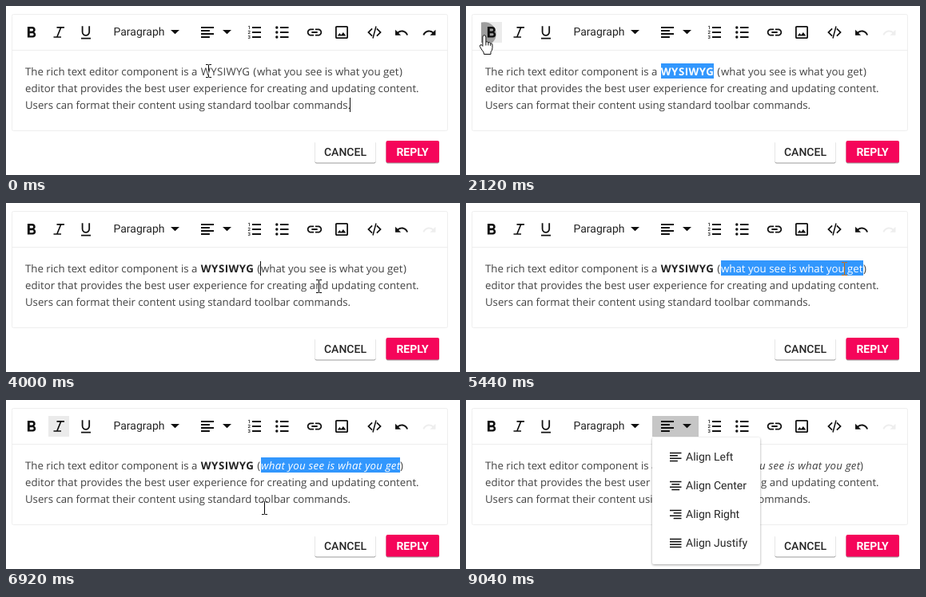
Write an HTML page that moves like this. It is 568x212 px and loops after 9760 ms.

```html
<!DOCTYPE html>
<html lang="en">
<head>
<meta charset="utf-8">
<title>Rich text editor</title>
<style>
  html, body { margin: 0; width: 100%; height: 100%; overflow: hidden; background: #fff; }
  svg { display: block; }
  #stage { width: 568px; height: 212px; }
  text { text-rendering: geometricPrecision; white-space: pre; }
  .copy { font: 13.25px "Open Sans", "Noto Sans", sans-serif; fill: #424242; }
  .wide { letter-spacing: .25px; }
  .bold { font-weight: 700; letter-spacing: .5px; }
  .italic { font-style: italic; letter-spacing: .29px; }
  .ui { font: 14px Roboto, Arial, sans-serif; fill: #262626; }
  .raised { filter: drop-shadow(0 1px .5px rgba(0,0,0,.4)); }
  #panel { filter: drop-shadow(0 1.5px 1.5px rgba(0,0,0,.36)); }
  #beam { mix-blend-mode: difference; }
</style>
</head>
<body>
<svg id="stage" viewBox="0 0 568 212" xmlns="http://www.w3.org/2000/svg">
  <rect width="568" height="212" fill="#fff"/>
  <rect x="7.5" y="10.5" width="545" height="146" rx="2" fill="none" stroke="#eee"/>
  <path d="M8 55.5H552" stroke="#eee"/>

  <g id="backs"></g>
  <g id="icons" fill="#111"></g>
  <text class="ui" x="134.5" y="37">Paragraph</text>

  <rect id="mark" y="72" height="19" fill="#3297fd"/>
  <g class="copy">
    <text x="24" y="87">The rich text editor component is a</text>
    <text id="word" x="243.8" y="87">WYSIWYG</text>
    <text id="open" y="87">(</text>
    <text id="phrase" y="87">what you see is what you get</text>
    <text id="close" y="87">)</text>
    <text x="24" y="108" style="letter-spacing:.012px">editor that provides the best user experience for creating and updating content.</text>
    <text x="24" y="129" style="letter-spacing:-.03px">Users can format their content using standard toolbar commands.</text>
  </g>
  <path id="caret" d="M0 0V18" stroke="#111"/>

  <rect class="raised" x="386.5" y="169" width="76" height="27.5" rx="2" fill="#fff"/>
  <text class="ui" x="424.5" y="188" text-anchor="middle" style="font-weight:500">CANCEL</text>
  <rect class="raised" x="475.5" y="169" width="66.5" height="27.5" rx="2" fill="#f5055a"/>
  <text class="ui" x="508.5" y="188" text-anchor="middle" style="font-weight:700;fill:#fff">REPLY</text>

  <g id="menu">
    <rect id="panel" rx="2" fill="#fff"/>
    <rect id="hover" x="233" width="135" height="36" fill="#eee"/>
    <g id="items"></g>
  </g>

  <path id="beam" fill="none" stroke="#fff"
    d="M-3.5-8H-1Q0-8 0-7Q0-8 1-8H3.5M0-7V7M-3.5 8H-1Q0 8 0 7Q0 8 1 8H3.5"/>
  <path id="hand" fill="#fff" stroke="#111" stroke-linejoin="round"
    d="M-1.6 1.5Q-1.6-.8.4-.8T2.4 1.5V7.6q1.9-1 3 .8 1.9-.8 2.8.9 2.3-.4 2.3 2V15q0 3-2 5.2V23H0q0-2.6-2-4.6-2.4-3.2-3.2-5.4 0-2.2 1.9-1.8 1 .4 1.7 1.7ZM2.4 7.6V12M5.4 8.4V12M8.2 9.3V12.4"/>
</svg>
<script>
const LOOP = 9760, STEP = 40;
const NS = 'http://www.w3.org/2000/svg';
const $ = id => document.getElementById(id);

function set(node, attrs) {
  for (const key in attrs) node.setAttribute(key, attrs[key]);
  return node;
}
function add(parent, tag, attrs) {
  return parent.appendChild(set(document.createElementNS(NS, tag), attrs));
}
const show = (node, on) => { node.style.display = on ? '' : 'none'; };
const within = (t, from, to) => t >= from && t < to;

// Toolbar icons
const icons = $('icons');
const shape = d => add(icons, 'path', { d });
const line = (parent, d, width) => add(parent, 'path', { d, fill: 'none', stroke: '#111', 'stroke-width': width });
// Places a 24-unit icon by its centre
const glyph = (d, x, y, k, flip = 1, mid = 12) =>
  add(icons, 'path', { d, transform: `translate(${x} ${y}) scale(${k * flip} ${k}) translate(-${mid} -12)` });

// kind: 0 left, 1 center, 2 right, 3 justify
function alignIcon(parent, x, y, width, gap, weight, kind) {
  let d = '';
  for (let i = 0; i < 4; i++) {
    const len = i % 2 && kind < 3 ? width * .68 : width;
    d += `M${x + (width - len) * kind / 2} ${y + i * gap}h${len}`;
  }
  line(parent, d, weight);
}

glyph('M15.6 10.79c.97-.67 1.65-1.77 1.65-2.79 0-2.26-1.75-4-4-4H7v14h7.04c2.09 0 3.71-1.7 3.71-3.79 0-1.52-.86-2.82-2.15-3.42zM10 6.5h3c.83 0 1.5.67 1.5 1.5s-.67 1.5-1.5 1.5h-3zM13.5 15.5H10v-3h3.5c.83 0 1.5.67 1.5 1.5s-.67 1.5-1.5 1.5z', 31.7, 33.8, .96);
line(icons, 'M63.5 26.8H73M59.5 39H69M68.7 27L63.8 39', 1.7);
line(icons, 'M95.6 25.2v7.3a4.3 4.3 0 0 0 8.6 0v-7.3M94 40.6h12', 1.8);
for (const x of [206, 271]) shape(`M${x} 30h11l-5.5 5.2z`);
alignIcon(icons, 244, 27, 16, 4, 2, 0);
[27, 33, 39].forEach((y, i) => {
  line(icons, `M308 ${y}H319M343 ${y}H353.5`, 2);
  add(icons, 'circle', { cx: 338.8, cy: y, r: 1.7 });
  add(icons, 'text', { x: 302.6, y: y + 2.2, style: 'font:500 6px Roboto,sans-serif' }).textContent = i + 1;
});
glyph('M3.9 12c0-1.71 1.39-3.1 3.1-3.1h4V7H7c-2.76 0-5 2.24-5 5s2.24 5 5 5h4v-1.9H7c-1.71 0-3.1-1.39-3.1-3.1zM8 13h8v-2H8zM17 7h-4v1.9h4c1.71 0 3.1 1.39 3.1 3.1s-1.39 3.1-3.1 3.1h-4V17h4c2.76 0 5-2.24 5-5s-2.24-5-5-5z', 386, 33, .92);
glyph('M19 5v14H5V5h14m0-2H5c-1.1 0-2 .9-2 2v14c0 1.1.9 2 2 2h14c1.1 0 2-.9 2-2V5c0-1.1-.9-2-2-2zm-4.86 8.86l-3 3.87L9 13.14 6 17h12z', 420, 33, .89);
glyph('M9.4 16.6L4.8 12l4.6-4.6L8 6l-6 6 6 6zM14.6 16.6l4.6-4.6-4.6-4.6L16 6l6 6-6 6z', 461, 33, .88);
line(icons, 'M463 25.5L459 40.5', 1.5);
const bend = 'M12.5 8c-2.65 0-5.05.99-6.9 2.6L2 7v9h9l-3.62-3.62c1.39-1.16 3.16-1.88 5.12-1.88 3.54 0 6.55 2.31 7.6 5.5l2.37-.78C21.08 11.03 17.15 8 12.5 8z';
glyph(bend, 495, 33.7, .78, 1, 12.2);
const redo = glyph(bend, 529.5, 33.7, .78, -1, 12.2);

// Drop-down items
const items = $('items');
['Left', 'Center', 'Right', 'Justify'].forEach((name, i) => {
  const y = 71 + i * 36;
  alignIcon(items, 255, y - 4.6, 14.5, 3.4, 1.5, i);
  add(items, 'text', { class: 'ui', x: 275, y: y + 5 }).textContent = 'Align ' + name;
});

// Buttons: hover span, pressed span, click time, ripple centre
const buttons = [
  { x: 19, w: 26, hover: [1400, 2080], on: [2080, 3800], click: 2080, tip: 23, tone: '#ebebeb' },
  { x: 53, w: 26, hover: [6000, 6160], on: [6160, 7400], click: 6160, tip: 66, tone: '#ebebeb' },
  { x: 233, w: 58, hover: [7880, 8320], on: [8320, LOOP], click: 8320, tip: 282, tone: '#c6c6c6' }
];
for (const b of buttons) {
  const box = add($('backs'), 'svg', { x: b.x, y: 20, width: b.w, height: 26 });
  b.back = add(box, 'rect', { width: b.w, height: 26 });
  b.ripple = add(box, 'circle', { cx: b.tip - b.x, cy: 15, fill: '#000' });
}

// Pointer path: time, x, y, eased
const path = [
  [0, 253, 80.5], [600, 256, 82], [1000, 256, 82], [1440, 13, 37, 1], [1680, 13, 37],
  [1880, 23, 37], [2160, 23, 37], [2520, 261, 83, 1], [2680, 261, 83], [2880, 281, 83],
  [3000, 281, 83], [3640, 320, 82], [3800, 320, 82], [4000, 391, 104], [4120, 410, 106],
  [4760, 481, 83, 1], [4960, 497, 82], [5120, 499, 83], [5440, 473, 82], [6080, 66, 38, 1],
  [6240, 66, 38], [6720, 322, 146, 1], [6920, 322.5, 135], [7360, 322.5, 135],
  [7960, 276, 38, 1], [8080, 276, 38], [8240, 282, 38], [8560, 282, 38],
  [9040, 366, 225, 1], [LOOP, 366, 225]
];
function pointer(t) {
  const i = path.findIndex(p => p[0] > t);
  const a = path[i - 1], b = path[i];
  let u = (t - a[0]) / (b[0] - a[0]);
  if (b[3]) u = u * u * (3 - 2 * u);
  return [a[1] + (b[1] - a[1]) * u, a[2] + (b[2] - a[2]) * u];
}

// Carets: x, top, from, to
const carets = [[430.5, 115, 0, 520], [318.5, 73, 3800, 4880], [322.5, 115, 7200, 8120]];

// Panel growth: from time, x, y, width, height, opacity
const growth = [[8440, 297, 74, 69, 14, .6], [8480, 233, 47, 135, 110, .85], [8520, 233, 47, 135, 159, 1]];

function drawText(t) {
  const bold = t >= 2080, italic = t >= 6200;
  const wordOn = within(t, 1000, 3800), phraseOn = within(t, 4880, 7200);
  const start = bold ? 319 : 314, width = italic ? 174 : 178;
  set($('word'), { class: bold ? 'bold' : 'wide' });
  $('word').style.fill = wordOn ? '#fff' : bold ? '#222' : '';
  set($('open'), { x: start - 4.7 });
  set($('phrase'), { x: start, class: italic ? 'italic' : '' });
  $('phrase').style.fill = phraseOn ? '#fff' : '';
  set($('close'), { x: start + width });
  show($('mark'), wordOn || phraseOn);
  set($('mark'), wordOn ? { x: 244, width: bold ? 66 : 61 } : { x: start, width });

  const c = carets.find(c => within(t, c[2], c[3]));
  show($('caret'), c && (t - c[2]) % 1060 < 530);
  if (c) set($('caret'), { transform: `translate(${c[0]} ${c[1]})` });
}

function drawButtons(t) {
  for (const b of buttons) {
    const on = within(t, ...b.on), age = t - b.click, lit = within(age, 0, 400);
    show(b.back, on || within(t, ...b.hover));
    set(b.back, { fill: on ? b.tone : '#ebebeb' });
    show(b.ripple, lit);
    if (lit) set(b.ripple, { r: 12 + age * .07, opacity: .36 * (1 - age / 400) });
  }
  set(redo, { fill: t < 2080 ? '#111' : '#eee' });
}

function drawMenu(t, pointerY) {
  const stage = growth.filter(g => t >= g[0]).pop();
  show($('menu'), stage);
  if (!stage) return;
  const [, x, y, width, height, opacity] = stage;
  const full = opacity === 1;
  set($('menu'), { opacity });
  set($('panel'), { x, y, width, height });
  show(items, full);
  const row = Math.floor((pointerY - 53) / 36);
  show($('hover'), full && row >= 0 && row < 4);
  set($('hover'), { y: 53 + row * 36 });
}

function draw(t) {
  const [x, y] = pointer(t);
  const hand = y < 47 || t > 8100;
  drawText(t);
  drawButtons(t);
  drawMenu(t, y);
  show($('hand'), hand);
  show($('beam'), !hand);
  const px = Math.round(x), py = Math.round(y);
  set($('hand'), { transform: `translate(${px - .5} ${py + .5})` });
  set($('beam'), { transform: `translate(${px + .5} ${py + .5})` });
}

function frame() {
  const t = performance.now() % LOOP;
  draw(Math.floor(t / STEP) * STEP);
  requestAnimationFrame(frame);
}
frame();
</script>
</body>
</html>
```
